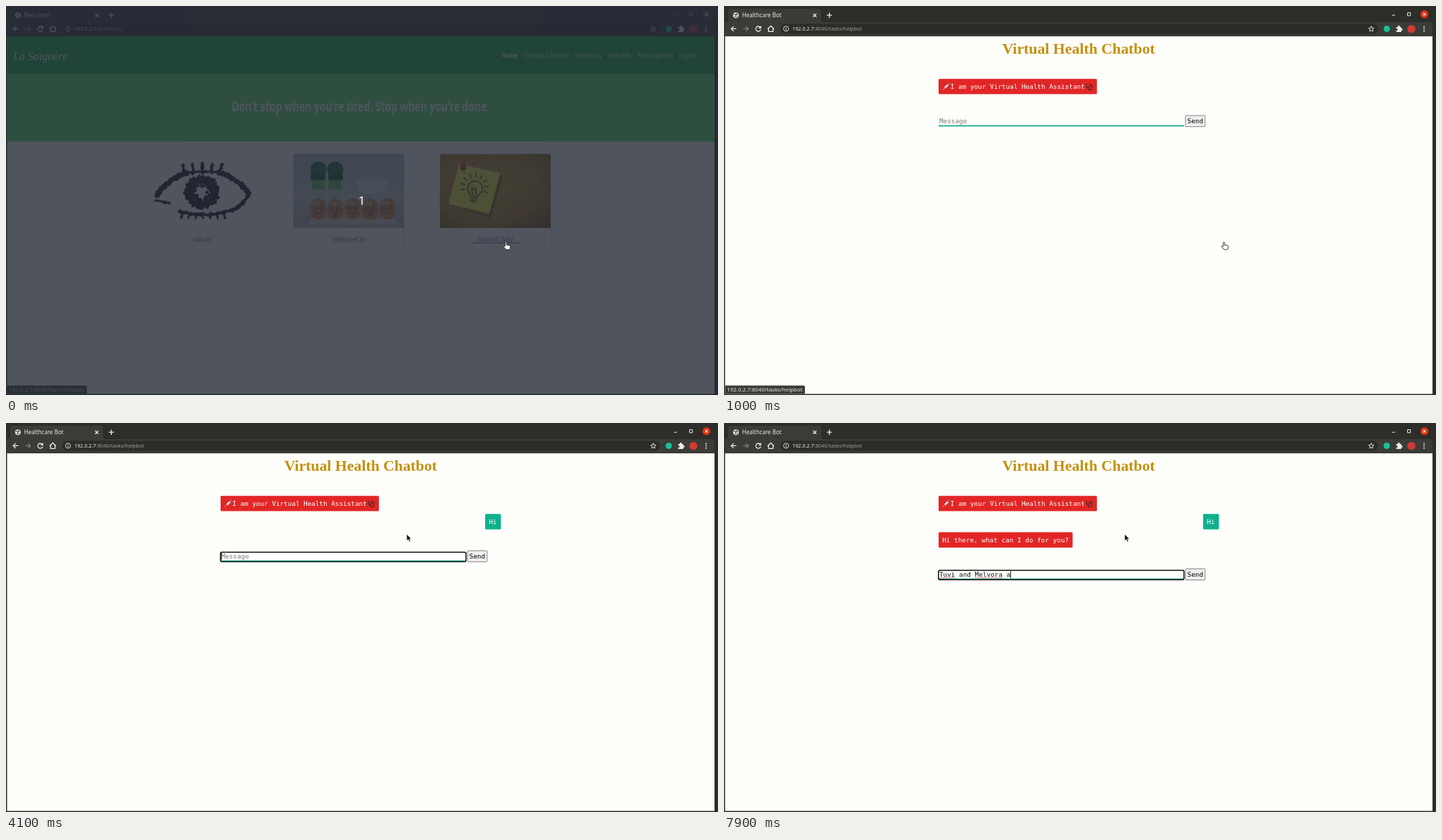
Animation of 1012x554 px, one loop 8000 ms. Source, as an HTML page:

```html
<!DOCTYPE html>
<html lang="en">
<head>
<meta charset="utf-8">
<title>Health chatbot demo</title>
<style>
  html, body { margin: 0; width: 100%; height: 100%; overflow: hidden; background: #2d2d29; }
  svg { display: block; width: 1012px; height: 554px; }
  .ui { font-family: "Noto Sans", "Open Sans", sans-serif; fill: #e9e9e5; }
  .bold, .light { font-family: "Open Sans", "Noto Sans", sans-serif; font-stretch: 75%; transform-box: fill-box; }
  .bold { font-weight: 700; transform-origin: left; }
  .light { font-weight: 300; font-size: 10.67px; fill: #26262a; text-anchor: middle; transform-origin: center; }
  .mid { text-anchor: middle; transform-origin: center; }
  .nav { font-size: 10.5px; fill: #fff; fill-opacity: .52; }
  /* used when the installed face has no condensed width */
  .squeeze .bold { transform: scaleX(.735); }
  .squeeze .light { transform: scaleX(.68); }
  .mono { font: 9.34px "DejaVu Sans Mono", monospace; fill: #fff; white-space: pre; }
  .brand { font: italic 16px "Liberation Serif", serif; fill: #fff; }
  .title { font: bold 21.8px "Liberation Serif", serif; fill: #c4900f; text-anchor: middle; }
  .line { fill: none; stroke: #ecece8; stroke-width: 1.3; }
  .card { fill: none; stroke: #dcdcda; }
  .doodle { fill: none; stroke: #3d3c0c; stroke-width: 1.5; stroke-linecap: round; }
</style>
</head>
<body>
<svg viewBox="0 0 1012 554">
  <defs>
    <linearGradient id="wall" x2="0" y2="1">
      <stop offset="0" stop-color="#b3bec4"/><stop offset=".6" stop-color="#c6cac9"/><stop offset="1" stop-color="#a9a7a1"/>
    </linearGradient>
    <radialGradient id="cork" cx=".42" cy=".4" r=".8">
      <stop offset="0" stop-color="#c99733"/><stop offset=".6" stop-color="#b07c20"/><stop offset="1" stop-color="#6f490c"/>
    </radialGradient>
    <clipPath id="board"><path d="M617 211h157v105h-157z"/></clipPath>
  </defs>

  <rect width="1012" height="554" fill="#2d2d29"/>
  <rect x="1.5" y="43" width="1005.5" height="509.5" fill="#fefefb"/>

  <g id="home">
    <rect x="1.5" y="43" width="1005.5" height="54.5" fill="#14b13c"/>
    <rect x="1.5" y="97.5" width="1005.5" height="95.5" fill="#5ce46a"/>
    <text class="brand" x="10" y="77">La Soignère</text>
    <text class="bold nav" x="704.5" y="74.3" style="fill-opacity:1">Home</text>
    <text class="bold nav" x="736" y="74.3">Consult a Doctor</text>
    <text class="bold nav" x="808.5" y="74.3">Pharmacy</text>
    <text class="bold nav" x="855" y="74.3">Near Me</text>
    <text class="bold nav" x="897.3" y="74.3">Prescriptions</text>
    <text class="bold nav" x="956" y="74.3">Logout</text>
    <text id="hero" class="bold mid" x="504" y="149.7" font-size="19" fill="#fff">Don’t stop when you’re tired. Stop when you’re done.</text>

    <path id="ink" fill="#191817"/>
    <path d="M275 262l3-2 4 2v4l-2 4h-4l-1-4z" fill="#fefefb"/>

    <g id="eggs">
      <rect x="409" y="211" width="157" height="105" fill="url(#wall)"/>
      <rect x="409" y="297" width="157" height="19" fill="#b5aea6"/>
      <path d="M497 246q1 20 20 22t27-20z" fill="#dde2e3"/>
      <ellipse cx="520" cy="247" rx="23" ry="4" fill="#cdd4d6"/>
      <path d="M435 246h17l3 32h-21zM459 246h17l3 32h-21z" fill="#b9c8bf"/>
      <path d="M435 247h17l1 14h-19zM459 247h17l1 14h-19z" fill="#58b957"/>
      <g fill="#1d6a3b"><circle cx="444" cy="233" r="11.5"/><circle cx="468" cy="233" r="11.5"/></g>
      <g fill="#174f2f"><rect x="433" y="239" width="21" height="9" rx="3"/><rect x="458" y="239" width="21" height="9" rx="3"/></g>
      <path d="M431 301h122l6 11h-132z" fill="#cfc9c2" stroke="#8f8981" stroke-width=".8"/>
    </g>

    <g clip-path="url(#board)">
      <rect x="617" y="211" width="157" height="105" fill="url(#cork)"/>
      <path id="dark" stroke="#6b460b" stroke-opacity=".45"/>
      <path id="pale" stroke="#e2b556" stroke-opacity=".5"/>
      <path d="M630 284l57 14 16-58 3 2-17 60z" fill="#4d3407" opacity=".6"/>
      <path d="M644 225l58 13-15 57-58-13z" fill="#f0ed3b"/>
      <path class="doodle" d="M659.5 270q0-4-3-7.500a10.500 10.500 0 1 1 18.500 3.500q-4 3-5 6zM660 273.500l9 1.500M660 276.500l8 1.500M662 279.500l4 1M663 269l-1-10 3 2 3-2 0 10"/>
      <path class="doodle" id="rays"/>
      <path d="M649 231l3 8" stroke="#77700f"/>
      <ellipse cx="650" cy="231" rx="4.500" ry="3" fill="#b71410"/><circle cx="650" cy="227" r="3.700" fill="#e22519"/>
    </g>
    <rect class="card" x="200.500" y="210.500" width="157" height="138.700" rx="2.500"/>
    <rect class="card" x="408.500" y="210.500" width="157.500" height="138.700" rx="2.500"/>
    <rect class="card" x="616.500" y="210.500" width="158" height="138.700" rx="2.500"/>
    <text class="light" x="279" y="336">Inkblot Test</text>
    <text class="light" x="487" y="336.300">Self-Assessment Test</text>
    <text class="light" x="695.300" y="336.300" style="fill:#40395c">Virtual Health Chatbot</text>
    <path d="M660.500 337.600h70" stroke="#5b5571" stroke-width=".9"/>
  </g>

  <g id="chat">
    <text class="title" x="504" y="68">Virtual Health Chatbot</text>
    <rect x="305" y="103.800" width="225" height="21.800" rx="1.500" fill="#e22626"/>
    <path d="M311 119.500l3-3" stroke="#c9d3d8" stroke-width=".8"/>
    <path d="M314 116.500l4.500-4.500" stroke="#d5e2e7" stroke-width="2.600"/>
    <path d="M318 112.500l2.500-2.500m-1.500-1l2.500 2.500" stroke="#6d8792" stroke-width="1.100"/>
    <text class="mono" x="321.800" y="117.900">I am your Virtual Health Assistant</text>
    <path d="M515.500 110.500q-1.500 5 1.500 5.500t3-5.500m-2.500 5.500q0 4 3 3.500t2-5.500" fill="none" stroke="#59262a" stroke-width="1.400"/>
    <circle cx="522.300" cy="113" r="1.500" fill="#4a3b3d"/>
    <g id="hi">
      <rect x="681" y="129.500" width="22.500" height="22" rx="1.500" fill="#0fb08c"/>
      <text class="mono" x="686.500" y="143.700">Hi</text>
    </g>
    <g id="reply">
      <rect x="305" y="155.400" width="190.500" height="22" rx="1.500" fill="#e22626"/>
      <text class="mono" x="310.200" y="169.600">Hi there, what can I do for you?</text>
    </g>
    <g id="form">
      <text id="field" class="mono" x="306" y="167.200"></text>
      <path d="M305 170.600h349" stroke="#12a78c" stroke-width="1.700"/>
      <path id="typo1" d="M306 168.900h22.500" stroke="#e0505a" stroke-dasharray="1.600 .7"/>
      <path id="typo2" d="M356.600 168.900h39.400" stroke="#e0505a" stroke-dasharray="1.600 .7"/>
      <rect id="focus" x="304.800" y="158" width="349" height="13.600" rx="2" fill="none" stroke="#101010" stroke-width="1.500"/>
      <rect id="caret" y="158.800" width=".9" height="10.500" fill="#111"/>
      <rect x="656" y="156" width="27.800" height="15.800" rx="1" fill="#efefef" stroke="#767676" stroke-width=".9"/>
      <text class="mono" x="658.600" y="167.200" style="fill:#000">Send</text>
    </g>
  </g>

  <g id="browser">
    <path d="M2 23q4 0 4-4v-11q0-4 4-4h124q4 0 4 4v11q0 4 4 4z" fill="#3b3b37"/>
    <circle cx="995.500" cy="11.800" r="5.700" fill="#dc3310"/>
    <g id="idle">
      <rect width="1012" height="23" fill="#3c3b37"/>
      <circle cx="995.500" cy="11.800" r="5.700" fill="#57564f"/>
    </g>
    <rect x="1" y="23" width="1006.500" height="20" fill="#3b3b37"/>
    <rect x="80" y="25.300" width="850" height="14.500" rx="7.200" fill="#2c2c28"/>
    <path d="M1 42.700h1006" stroke="#2a2a26" stroke-width=".8"/>
    <circle cx="17" cy="13.200" r="4" fill="#ecece8"/>
    <path d="M14 11.500l2.500 1 .5 2-1.500 1.500M18 9.800l-.5 2 2.500.8M18.500 16.500l.8-1.800" fill="none" stroke="#3b3b37" stroke-width="1.100"/>
    <text class="ui" id="tab" x="25.800" y="16" font-size="8"></text>
    <path class="line" d="M126.700 10.900l4.600 4.600m0-4.600l-4.600 4.600M146 13.200h7.400M149.700 9.500v7.400"/>
    <path class="line" d="M17.500 32.400h-7m3.300-3.500l-3.500 3.500 3.500 3.500"/>
    <path class="line" d="M27.500 32.400h7m-3.300-3.500l3.500 3.500-3.500 3.500" style="stroke:#85857f"/>
    <path class="line" d="M51.500 30.300a3.500 3.500 0 1 0 .7 3M52.200 28.500v2.800h-2.800"/>
    <path class="line" d="M62 32.700l4.500-4.200 4.500 4.200M63.300 32v4.400h6.400v-4.400"/>
    <circle class="line" cx="88.200" cy="32.400" r="3.600" style="stroke-width:.9"/>
    <path class="line" d="M88.200 30.300v1m0 .8v2.500" style="stroke-width:1"/>
    <text class="ui" x="97" y="35.200" font-size="7.300">192.0.2.7<tspan id="path" fill="#a1a19b"></tspan></text>
    <path class="line" d="M920 28.600l1.100 2.700 2.800.2-2.200 1.800.7 2.800-2.400-1.600-2.400 1.600.7-2.800-2.200-1.800 2.800-.2z" style="stroke-width:.9"/>
    <circle cx="942" cy="32.500" r="4.500" fill="#15c39a"/>
    <path d="M955.500 30h2.300a1.500 1.500 0 1 1 2.700 0h2.200v2.300a1.400 1.400 0 1 1 0 2.700v2h-7.200v-2.200a1.400 1.400 0 1 0 0-2.600z" fill="#ecece8"/>
    <circle cx="977" cy="32.700" r="5.800" fill="#cf3a33"/>
    <g fill="#ecece8"><circle cx="995" cy="29.400" r="1"/><circle cx="995" cy="32.600" r="1"/><circle cx="995" cy="35.800" r="1"/></g>
    <path class="line" id="buttons" d="M949.500 13.200h4.200M971.500 9.600h4.200v4.200h-4.200z" style="stroke-width:1"/>
    <path class="line" d="M993.700 10l3.600 3.600m0-3.600l-3.600 3.600" style="stroke-width:1.100"/>
  </g>

  <g id="status">
    <path d="M1.500 552.500v-12h111.500q2 0 2 2v10z" fill="#3b3b37"/>
    <text class="ui" x="4.300" y="549.200" font-size="7.900">192.0.2.7:8040/tasks/helpbot</text>
  </g>

  <g id="veil">
    <rect width="1012" height="554" fill="#242a36" fill-opacity=".8"/>
    <text class="ui" x="505.500" y="283.300" font-size="17" text-anchor="middle" style="fill:#fff">1</text>
  </g>

  <g id="hand">
    <path d="M-.9 6v-5q0-1 1-1t1 1v3l3.900.7q1.400.3 1.300 1.700l-.6 3.300q-.2 1-1.100 1h-4l-3.700-4q-.5-.9.300-1.200 1-.2 1.900.5z" fill="#fff" stroke="#222" stroke-width=".9"/>
  </g>
  <path id="arrow" d="M0 0v9.500l2.200-2 1.600 3.500 1.600-.7-1.600-3.400h3z" fill="#181818" stroke="#fff" stroke-width=".5"/>
  <path id="beam" d="M-2.300-5q2 0 2.300 1 .3-1 2.300-1M0-4v8M-2.300 5q2 0 2.300-1 .3 1 2.300 1" fill="none" stroke="#222"/>
</svg>
<script>
const $ = id => document.getElementById(id);
const show = (id, on) => { $(id).style.opacity = Number(on); };

let seed = 7;
const rnd = (lo, hi) => {
  seed = (seed * 16807) % 2147483647;
  return lo + (hi - lo) * seed / 2147483647;
};

// Inkblot: ragged blots strung along curves
function blot(x, y, r) {
  let d = '';
  for (let i = 0; i < 7; i++) {
    const a = i * Math.PI * 2 / 7, s = r * rnd(.6, 1.3);
    d += (i ? 'L' : 'M') + (x + s * Math.cos(a)).toFixed(1) + ' ' + (y + s * Math.sin(a)).toFixed(1);
  }
  return d + 'z';
}
function trail(x0, y0, x1, y1, x2, y2, r) {
  let d = '';
  const n = Math.ceil(Math.hypot(x2 - x0, y2 - y0) / 2.2);
  for (let i = 0; i <= n; i++) {
    const k = i / n, j = 1 - k;
    d += blot(j * j * x0 + 2 * j * k * x1 + k * k * x2, j * j * y0 + 2 * j * k * y1 + k * k * y2, r * rnd(.7, 1.2));
  }
  return d;
}
let ink = trail(214, 271, 228, 247, 256, 238, 3.8) + trail(345, 267, 332, 247, 303, 237, 3.8)
  + trail(213, 277, 221, 278, 232, 281, 2) + trail(345, 268, 336, 286, 318, 292, 3.2)
  + trail(246, 292, 279, 302, 313, 293, 2.8) + trail(256, 238, 279, 234, 303, 237, 2);
for (let i = -2; i <= 2; i++) {
  const x = 279 + i * 13;
  ink += trail(x + i, 224 + Math.abs(i) * 1.5, x, 230, x, 238, 2.5);
}
for (let x = 250; x < 312; x += 10) ink += trail(x, 295, x, 299, x + (x - 279) * .05, 302, 1.8);
for (let i = 0; i < 110; i++) {
  const a = i * 2.4, r = 7 + 16 * Math.sqrt(i / 110);
  ink += blot(278.5 + r * 1.05 * Math.cos(a), 265 + r * Math.sin(a), 3);
}
$('ink').setAttribute('d', ink);

// Eggs with drawn faces
let eggs = '';
for (let i = 0; i < 5; i++) {
  const x = 443.5 + i * 24.7, y = 289 + (i % 2);
  const mouth = i % 2 ? `M${x - 2} ${y + 6}a2 3 0 1 0 4 0 2 3 0 1 0-4 0` : `M${x - 5} ${y + 5}q5 5 10-1`;
  eggs += `<ellipse cx="${x}" cy="${y}" rx="11.7" ry="15.5" fill="#cb8148"/>
    <ellipse cx="${x - 2}" cy="${y - 6}" rx="6.5" ry="6" fill="#dfa26c"/>
    <path d="M${x - 6} ${y - 2}a2.4 2.8 0 1 0 4.8 0 2.4 2.8 0 1 0-4.800 0m7 0a2.400 2.800 0 1 0 4.800 0 2.400 2.800 0 1 0-4.800 0${mouth}" fill="none" stroke="#4b2915" stroke-width="1"/>`;
}
$('eggs').insertAdjacentHTML('beforeend', eggs + '<path d="M432 305h121M486 309l6 3 5-3" fill="none" stroke="#eee8e1" stroke-width="1.2"/>');

// Cork grain and light rays
for (const id of ['dark', 'pale']) {
  let d = '';
  for (let i = 0; i < 520; i++) d += `M${rnd(617, 774).toFixed(1)} ${rnd(211, 316).toFixed(1)}h1.2`;
  $(id).setAttribute('d', d);
}
let rays = '';
for (let i = 0; i < 9; i++) {
  const a = (168 + i * 27) * Math.PI / 180, c = Math.cos(a), s = Math.sin(a);
  rays += `M${666 + 14.5 * c} ${258 + 14.5 * s}L${666 + 20 * c} ${258 + 20 * s}`;
}
$('rays').setAttribute('d', rays);

if ($('hero').getComputedTextLength() > 430) document.body.classList.add('squeeze');

const LOOP = 8000, CHAR = 5.625;
const PHRASE = 'Tuvi and Melvora a';
// [time, letters typed]
const KEYS = [[5200, 1], [5400, 2], [5500, 3], [5600, 4], [5800, 5], [5900, 6], [6000, 7], [6200, 8], [6500, 9],
  [6600, 10], [6900, 11], [7200, 12], [7300, 13], [7400, 14], [7500, 15], [7700, 17], [7900, 18]];
// [time, pointer, x, y]
const POINTER = [[0, 'hand', 710.5, 336.3], [1900, 'arrow', 710, 336], [2100, 'arrow', 698, 316],
  [2200, 'arrow', 634, 236], [2300, 'arrow', 576, 175.3], [2400, 'beam', 571, 162], [2500, 'beam', 570, 161],
  [2900, 'beam', 570, 160], [3000, 'beam', 570, 159.3], [4100, 'arrow', 569.5, 158.3]];
const latest = (cues, t) => cues.filter(c => c[0] <= t).pop();

function typed(t) {
  if (t < 4000) return 'Hi'.slice(0, t < 3200 ? 0 : t < 3300 ? 1 : 2);
  const key = latest(KEYS, t);
  return key ? PHRASE.slice(0, key[1]) : '';
}

function draw(now) {
  const t = now % LOOP, chat = t >= 1000;
  const active = t < 800 ? 0 : t < 900 ? .5 : 1;
  show('veil', t < 500);
  show('home', !chat);
  show('chat', chat);
  show('idle', 1 - active);
  show('buttons', .5 + active / 2);
  show('status', t < 1300 ? 1 : t < 1400 ? .66 : t < 1500 ? .33 : 0);
  $('tab').textContent = chat ? 'Healthcare Bot' : 'Welcome!';
  $('path').textContent = ':8040/tasks' + (chat ? '/helpbot' : '');

  show('hi', t >= 4000);
  show('reply', t >= 4500);
  $('form').setAttribute('transform', `translate(0 ${t < 4000 ? 0 : t < 4500 ? 25.9 : 51.7})`);
  const text = typed(t);
  $('field').textContent = text || 'Message';
  $('field').style.fill = text ? '#111' : '#7a7a78';
  show('focus', t >= 2600);
  show('caret', t >= 2600 && !(t >= 4700 && t < 5200));
  $('caret').setAttribute('x', 305.8 + text.length * CHAR);
  show('typo1', t >= 5800);
  show('typo2', t >= 7900);

  const [, kind, x, y] = latest(POINTER, t);
  for (const id of ['hand', 'arrow', 'beam']) show(id, id === kind);
  $(kind).setAttribute('transform', `translate(${x} ${y})`);
}

const start = performance.now();
function tick() {
  draw(performance.now() - start);
  requestAnimationFrame(tick);
}
tick();
</script>
</body>
</html>
```
